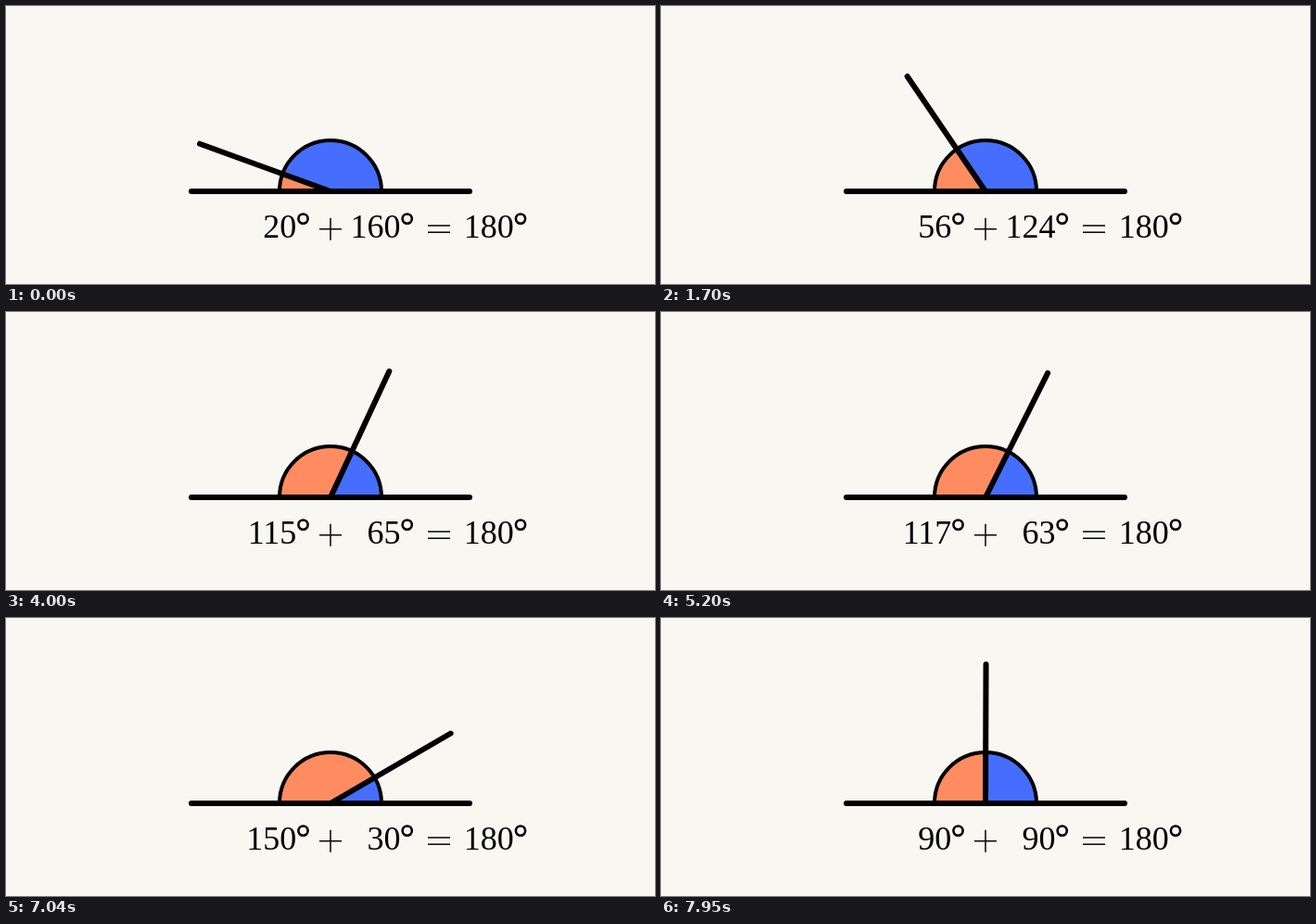
Write an HTML page with a canvas that moves like this. It is 700 px wide and 300 px high and loops after 8000 ms.

```html
<!DOCTYPE html>
<html lang="en">
<head>
<meta charset="utf-8">
<title>Supplementary angles</title>
<style>
  html, body { margin: 0; overflow: hidden; background: #f8f7f2; }
  canvas { display: block; }
</style>
</head>
<body>
<canvas id="stage" width="700" height="300"></canvas>
<script>
const ctx = document.getElementById('stage').getContext('2d');
const LOOP = 8000, FPS = 24, CX = 350, CY = 200, ARM = 150, RADIUS = 55;
const MOVES = [
  { start: 1000, from: 20, to: 60 },
  { start: 3008, from: 60, to: 115 },
  { start: 5000, from: 115, to: 150 },
  { start: 7000, from: 150, to: 90 },
];

// Sigmoid easing, rescaled to run exactly from 0 to 1.
const sigmoid = x => 1 / (1 + Math.exp(-x));
const EDGE = sigmoid(-5);
const smooth = u => (sigmoid(10 * u - 5) - EDGE) / (1 - 2 * EDGE);

function angleAt(time) {
  let angle = MOVES[0].from;
  for (const { start, from, to } of MOVES) {
    if (time < start) break;
    angle = from + (to - from) * smooth(Math.min(1, (time - start) / 1000));
  }
  return angle;
}

function line(x1, y1, x2, y2, width, cap = 'butt') {
  ctx.lineWidth = width;
  ctx.lineCap = cap;
  ctx.beginPath();
  ctx.moveTo(x1, y1);
  ctx.lineTo(x2, y2);
  ctx.stroke();
}

function sector(start, end, color) {
  ctx.fillStyle = color;
  ctx.beginPath();
  ctx.moveTo(CX, CY);
  ctx.arc(CX, CY, RADIUS, start, end);
  ctx.fill();
}

function ring(x, y, radius, width, end) {
  ctx.lineWidth = width;
  ctx.lineCap = 'butt';
  ctx.beginPath();
  ctx.arc(x, y, radius, Math.PI, end);
  ctx.stroke();
}

function degrees(value, right) {
  ctx.fillStyle = '#000';
  ctx.fillText(value, right, 250.2);
  ring(right + 7.2, 229.6, 5.1, 2.6, 3 * Math.PI);
}

function draw(time) {
  const angle = angleAt(time);
  const left = Math.round(angle);
  const split = Math.PI * (1 + angle / 180);

  ctx.fillStyle = '#f8f7f2';
  ctx.fillRect(0, 0, 700, 300);
  ctx.strokeStyle = '#000';

  sector(Math.PI, split, '#ff8c61');
  sector(split, 2 * Math.PI, '#456eff');
  ring(CX, CY, RADIUS, 4, 2 * Math.PI);
  line(CX - ARM, CY, CX + ARM, CY, 6, 'round');
  line(CX, CY, CX + ARM * Math.cos(split), CY + ARM * Math.sin(split), 6, 'round');

  ctx.font = '36px "Liberation Serif", serif';
  ctx.textAlign = 'right';
  degrees(left, 313.3);
  degrees(180 - left, 425.5);
  degrees(180, 547.8);
  line(338, 240.7, 362, 240.7, 1.5);
  line(350, 228.7, 350, 252.7, 1.5);
  line(455, 237, 479, 237, 1.5);
  line(455, 244.2, 479, 244.2, 1.5);
}

function tick() {
  const time = performance.now() % LOOP;
  const step = Math.floor((time + 8.5) * FPS / 1000) % (LOOP * FPS / 1000);
  draw(step * 1000 / FPS);
  requestAnimationFrame(tick);
}
tick();
</script>
</body>
</html>
```
